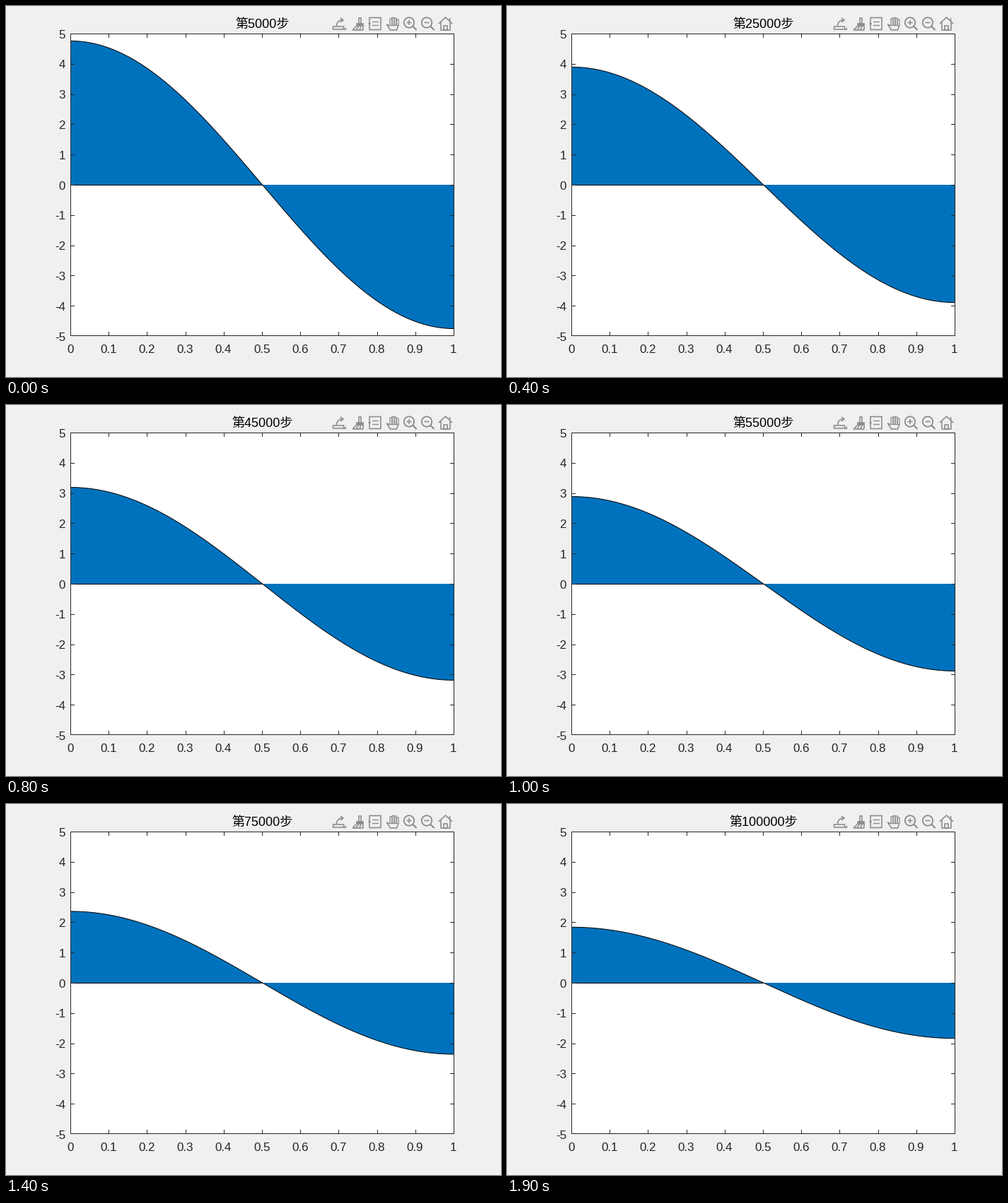
These frames come from a looping animation (700 px wide and 525 px high, 2 s). A matplotlib script:

```python
import numpy as np
import matplotlib.pyplot as plt
from matplotlib.animation import FuncAnimation
from matplotlib.patches import Arc, Circle, Polygon, Rectangle

W, H, DPI = 700, 525, 100
PX = 72 / DPI                      # one pixel in points
FRAMES, INTERVAL = 20, 100
LEFT, RIGHT, TOP, BOTTOM = 91.5, 633.5, 39, 467
X0, X1, Y0, Y1 = 91.5, 633.5, 39.5, 466.5      # frame line centres
INK, ICON, BLUE = "#262626", "#8c8c8c", "#0072bd"
FONTS = ["Liberation Sans", "Noto Sans CJK JP"]

fig = plt.figure(figsize=(W / DPI, H / DPI), dpi=DPI, facecolor="#f0f0f0")
ax = fig.add_axes([0, 0, 1, 1])
ax.set_xlim(0, W)
ax.set_ylim(H, 0)
ax.axis("off")


def px(x):
    return LEFT + (RIGHT - LEFT) * x


def py(y):
    return TOP + (BOTTOM - TOP) * (5 - y) / 10


def line(xs, ys, color=ICON, width=1.6, z=6):
    return ax.plot(xs, ys, color=color, lw=width * PX, zorder=z, snap=False,
                   solid_capstyle="butt")[0]


def box(x, y, w, h, **style):
    style = dict(fc="none", ec=ICON, lw=1.6 * PX, zorder=6) | style
    ax.add_patch(Rectangle((x, y), w, h, snap=False, **style))


def label(x, y, s, size, ha="center", color=INK):
    return ax.text(x, y, s, family=FONTS, fontsize=size * PX, ha=ha,
                   va="baseline", color=color, zorder=7)


def draw_axes():
    frame = dict(lw=PX, zorder=5, ec=INK)
    box(X0, Y0, X1 - X0, Y1 - Y0, fc="white", ec="none", zorder=1)
    box(X0, Y0, X1 - X0, Y1 - Y0, **frame)
    for k in range(11):
        x = np.floor(px(k / 10)) + 0.5
        y = min(np.floor(py(5 - k) + 0.5) + 0.5, Y1)
        for edge, inward in ((Y0, 5.5), (Y1, -5.5)):
            line([x, x], [edge, edge + inward], INK, 1, 5)
        for edge, inward in ((X0, 5.5), (X1, -5.5)):
            line([edge, edge + inward], [y, y], INK, 1, 5)
        label(px(k / 10) - 0.8, 491, f"{k / 10:g}", 17)
        label(84, py(5 - k) + 6.6, str(5 - k), 17, "right")


def export_icon(x, y):
    box(x - 8.5, y + 4, 15, 4)
    ax.add_patch(Arc((x + 4, y + 3), 15, 16, theta1=180, theta2=270,
                     ec=ICON, lw=1.6 * PX, zorder=6))
    line([x + 2, x + 6, x + 2], [y - 8, y - 5, y - 2])
    ax.add_patch(Polygon([(x + 10, y + 5), (x + 10, y + 9), (x + 6, y + 9)],
                         fc=ICON, zorder=6))


def brush_icon(x, y):
    box(x + 1, y - 8, 3, 8)
    box(x - 2, y, 9, 3, fc=ICON)
    for k in range(4):
        line([x - 2 + 3 * k, x - 8 + 5 * k], [y + 3, y + 9])
    line([x - 8, x + 7], [y + 9, y + 9])


def tip_icon(x, y):
    box(x - 8, y - 8.5, 16, 17)
    line([x - 9.5, x - 6], [y, y])
    for dy in (-2.5, 2.5):
        line([x - 4, x + 5], [y + dy, y + dy], width=1.4)


def hand_icon(x, y):
    for k in range(4):
        rise = 3 * np.sin(np.pi * (k + 0.8) / 4)
        box(x - 3.5 + 3 * k, y - 5.5 - rise, 3, 8 + rise, lw=1.3 * PX)
    line([x - 4, x - 8, x - 3, x + 6, x + 8.5],
         [y + 3, y + 1, y + 9, y + 9, y + 2])


def zoom_icon(x, y, plus):
    ax.add_patch(Circle((x, y), 7.2, fc="none", ec=ICON, lw=1.8 * PX, zorder=6))
    line([x + 5, x + 10.5], [y + 5, y + 10.5], width=2.2)
    line([x - 3.5, x + 3.5], [y, y])
    if plus:
        line([x, x], [y - 3.5, y + 3.5])


def home_icon(x, y):
    line([x - 9.5, x, x + 9.5], [y, y - 9, y])
    line([x - 6.5, x - 6.5, x + 6.5, x + 6.5], [y - 2, y + 9, y + 9, y - 2])
    box(x - 2.5, y + 3, 5, 6)
    line([x + 6, x + 6], [y - 8, y - 3])


def draw_toolbar():
    export_icon(471, 25)
    brush_icon(498, 25)
    tip_icon(522, 25)
    hand_icon(546.5, 25)
    zoom_icon(570, 23.5, True)
    zoom_icon(595, 23.5, False)
    home_icon(621.5, 25)


draw_axes()
draw_toolbar()

grid = np.linspace(0, 1, 201)
area = Polygon([(0, 0)], fc=BLUE, ec="none", zorder=2)
ax.add_patch(area)
curve = line([], [], "black", 1, 3)
line([X0, px(0.5)], [253.5, 253.5], "black", 1, 3)
title = label(362.5, 32, "", 18, color="black")


def update(i):
    step = 5000 * (i + 1)
    xs = px(grid)
    ys = py(5 * np.exp(-step / 1e5) * np.cos(np.pi * grid))
    area.set_xy([(LEFT, 253), *zip(xs, ys), (RIGHT, 253)])
    curve.set_data(xs, ys)
    title.set_text(f"第{step}步")
    return area, curve, title


anim = FuncAnimation(fig, update, frames=FRAMES, interval=INTERVAL,
                     repeat=True, repeat_delay=0, init_func=lambda: update(0))
plt.show()
```
